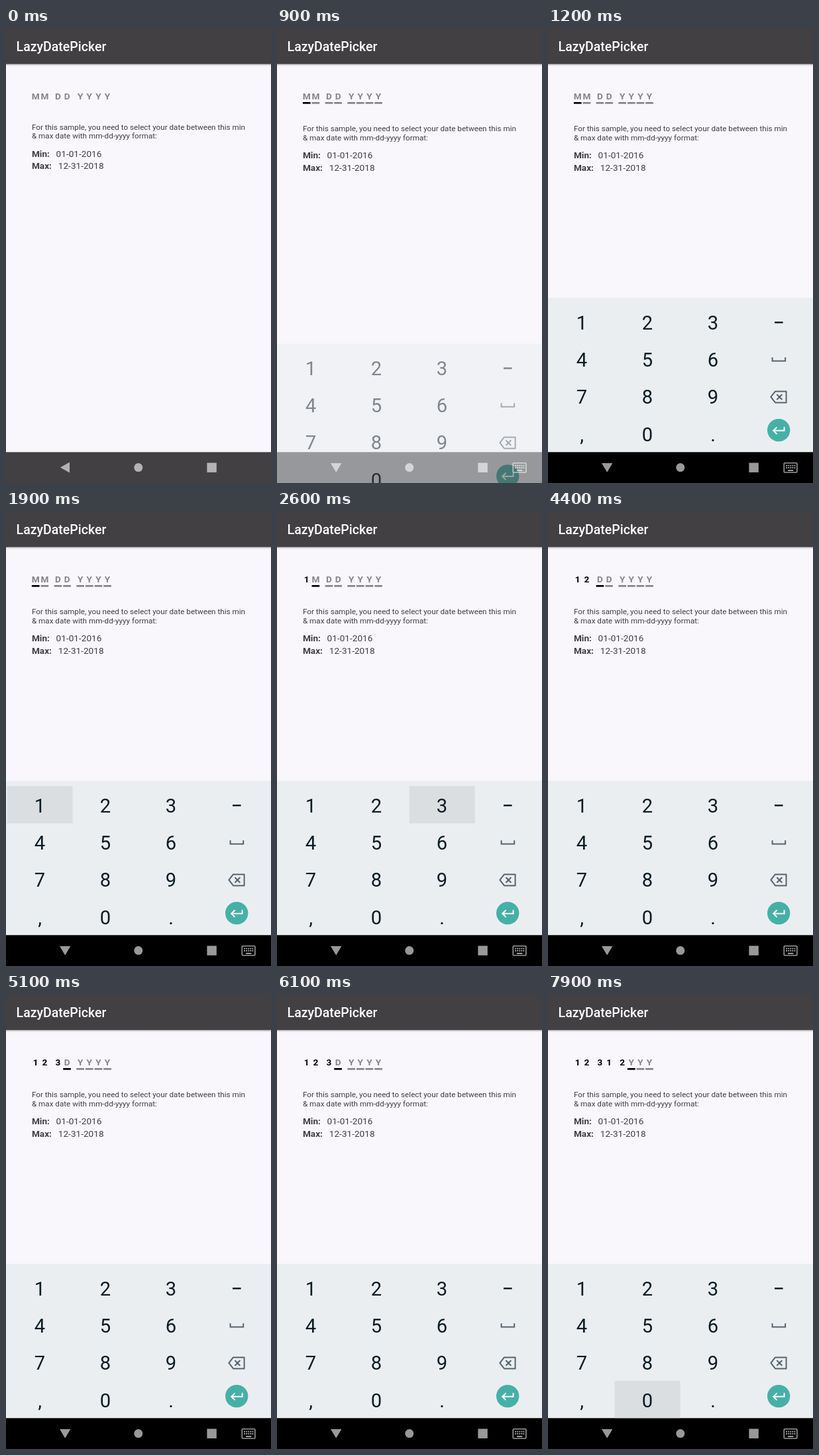
Recreate the animation shown at these times as an HTML page. Size 400x688 px, loop 8 s.

```html
<!DOCTYPE html>
<html lang="en">
<head>
<meta charset="utf-8">
<title>LazyDatePicker</title>
<style>
  html, body { margin: 0; width: 100%; height: 100%; overflow: hidden; background: #f9f7fb; }
  svg { display: block; width: 400px; height: 688px; font-family: Roboto, sans-serif; }
  .title { font-size: 19.5px; font-weight: 500; fill: #fff; }
  .hint { font-size: 11.68px; fill: #403e41; }
  .limit { font-size: 13.63px; fill: #403e41; }
  .limit .b { font-weight: 700; }
  .cell { font-size: 13.63px; font-weight: 700; text-anchor: middle; }
  .key { font-size: 29.2px; fill: #0b1c24; text-anchor: middle; }
  .line { fill: none; stroke: #54646c; stroke-width: 2; }
</style>
</head>
<body>
<svg viewBox="0 0 400 688">
  <defs>
    <linearGradient id="shade" x2="0" y2="1">
      <stop offset="0" stop-color="#000" stop-opacity=".24"/>
      <stop offset="1" stop-color="#000" stop-opacity="0"/>
    </linearGradient>
    <clipPath id="room"><rect x="38" y="90" width="330" height="30"/></clipPath>
  </defs>
  <rect width="400" height="688" fill="#f9f7fb"/>
  <rect y="54" width="400" height="4" fill="url(#shade)"/>
  <rect width="400" height="54.5" fill="#424043"/>
  <text class="title" x="15.6" y="35">LazyDatePicker</text>

  <g clip-path="url(#room)"><g id="date"></g></g>
  <g id="info">
    <text class="hint" x="38.9" y="153.7">For this sample, you need to select your date between this min</text>
    <text class="hint" x="38.9" y="167.3">&amp; max date with mm-dd-yyyy format:</text>
    <text class="limit" y="194.7"><tspan class="b" x="38.9">Min:</tspan><tspan x="75.6">01-01-2016</tspan></text>
    <text class="limit" y="213.2"><tspan class="b" x="38.9">Max:</tspan><tspan x="78.8">12-31-2018</tspan></text>
  </g>

  <rect y="641.3" width="400" height="46.7" fill="#424043"/>
  <g id="board">
    <rect y="408" width="400" height="234" fill="#ebeef1"/>
    <rect y="641.3" width="400" height="190" fill="#000"/>
    <rect id="press" width="99" height="56.3" fill="#dadee1"/>
    <g id="keys"></g>
    <path d="M342 445.2h12.6" stroke="#0b1c24" stroke-width="2.5"/>
    <path class="line" d="M338.6 498v5.5h19.6v-5.5"/>
    <path class="line" d="M343 549.4h16.6v17H343l-6.6-8.5zM345.4 554l8 8m0-8l-8 8" stroke-linejoin="round"/>
    <circle cx="348.2" cy="608.1" r="17.2" fill="#46b0a7"/>
    <path d="M356.6 603.2v5.6h-16m5-5.3l-5.4 5.3 5.4 5.3" fill="none" stroke="#fff" stroke-width="2"/>
  </g>

  <g fill="#fff" opacity=".6">
    <path id="back"/>
    <circle cx="199.8" cy="664.6" r="6.5"/>
    <rect x="303.4" y="657.5" width="14.4" height="14.4"/>
    <g id="ime">
      <rect x="356.3" y="657.8" width="19.6" height="14.2" rx="1" fill="none" stroke="#fff" stroke-width="1.6"/>
      <path d="M359 661.7h14.4M359 665h14.4" stroke="#fff" stroke-width="2" stroke-dasharray="2 1.1"/>
      <path d="M362 669h8.4" stroke="#fff" stroke-width="2"/>
    </g>
  </g>
</svg>
<script>
const $ = id => document.getElementById(id);
const LOOP = 8000;
const MASK = "MMDDYYYY", TYPED = "12312";
const KEYS = ["123", "456", "789", ",0."];
const colX = c => 51 + 99 * c;
const rowY = r => 455.6 + 56.3 * r;
const cellX = i => 38.9 + 13.63 * i + 6.45 * ((i > 1) + (i > 3));

// Each step changes only the listed properties.
const STEPS = [
  [0, { focus: false, kb: 0, typed: 0, key: "", shift: 0 }],
  [600, { focus: true }],
  [800, { kb: 0.12 }],
  [900, { kb: 0.505 }],
  [1000, { kb: 0.84 }],
  [1100, { kb: 0.96 }],
  [1200, { kb: 1 }],
  [1900, { key: "1" }],
  [2500, { key: "", typed: 1 }],
  [2600, { key: "3" }],
  [2700, { key: "", shift: 3 }],
  [2800, { shift: 5.5 }],
  [2900, { shift: -2.2 }],
  [3400, { shift: 0 }],
  [3500, { key: "2" }],
  [4400, { key: "", typed: 2 }],
  [4500, { key: "3" }],
  [5100, { key: "", typed: 3 }],
  [5200, { shift: 3 }],
  [5300, { shift: 5.5 }],
  [5400, { shift: -2.2 }],
  [6100, { shift: 0 }],
  [7200, { typed: 4 }],
  [7300, { typed: 5 }],
  [7900, { key: "0" }]
];

$("keys").innerHTML = KEYS.map((row, r) => [...row].map((k, c) =>
  `<text class="key" x="${colX(c)}" y="${rowY(r)}">${k}</text>`).join("")).join("");

$("date").innerHTML = [...MASK].map((_, i) =>
  `<text class="cell" x="${cellX(i) + 5.85}" y="108.1"></text>
   <rect x="${cellX(i)}" y="112" width="11.7" height="2.7"/>`).join("");
const letters = [...document.querySelectorAll(".cell")];
const bars = [...$("date").querySelectorAll("rect")];

function draw(s) {
  letters.forEach((el, i) => {
    const done = i < s.typed;
    el.textContent = done ? TYPED[i] : MASK[i];
    el.setAttribute("fill", done ? "#000" : "#868487");
    bars[i].setAttribute("fill", i === s.typed ? "#000" : "#868487");
    bars[i].style.display = s.focus && !done ? "" : "none";
  });
  $("date").setAttribute("transform", `translate(${s.shift} 0)`);
  $("info").setAttribute("transform", `translate(0 ${s.focus ? 2.7 : 0})`);

  $("board").setAttribute("opacity", s.kb);
  $("board").setAttribute("transform", `translate(0 ${140 * (1 - s.kb)})`);
  $("ime").style.display = s.kb ? "" : "none";
  $("back").setAttribute("d", s.kb ? "M81 657.9h16.4l-8.2 13.8z" : "M82 664.6l14-8v16z");

  const r = KEYS.findIndex(row => s.key && row.includes(s.key));
  $("press").style.display = r < 0 ? "none" : "";
  if (r >= 0) {
    $("press").setAttribute("x", 2 + 99 * KEYS[r].indexOf(s.key) - 0.4);
    $("press").setAttribute("y", 416 + 56.3 * r);
  }
}

const start = performance.now();
let shown = -1;
function tick() {
  const t = (performance.now() - start) % LOOP;
  const n = STEPS.filter(([at]) => at <= t).length;
  if (n !== shown) {
    shown = n;
    draw(Object.assign({}, ...STEPS.slice(0, n).map(step => step[1])));
  }
  requestAnimationFrame(tick);
}
tick();
</script>
</body>
</html>
```
